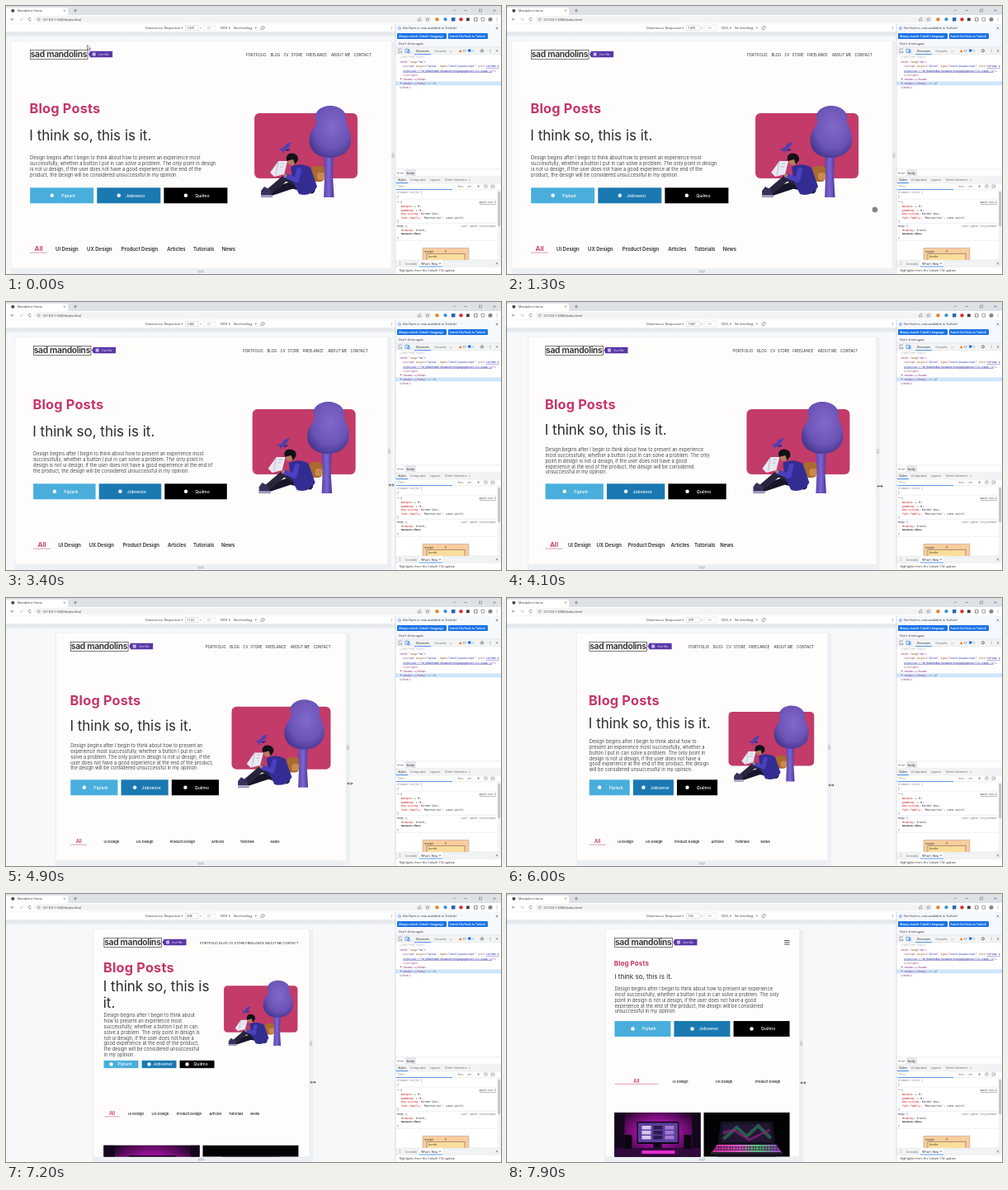
Animation of 600 by 325 pixels, one loop 8000 ms. Source, as an HTML page:

```html
<!DOCTYPE html>
<html lang="en">
<head>
<meta charset="utf-8">
<title>Responsive page preview</title>
<style>
html, body { margin: 0; width: 100%; height: 100%; overflow: hidden; background: #fff; }
svg { display: block; width: 600px; height: 325px; }
text { white-space: pre; }
.ui { font-family: "Open Sans", "Noto Sans", sans-serif; }
.code { font-family: "DejaVu Sans Mono", "Noto Sans Mono", monospace; }
.page { font-family: Inter, "Open Sans", sans-serif; }
</style>
</head>
<body>
<svg viewBox="0 0 600 325" xmlns="http://www.w3.org/2000/svg">
  <defs>
    <linearGradient id="bark"><stop offset="0" stop-color="#5c46ad"/><stop offset=".5" stop-color="#7d64d2"/><stop offset="1" stop-color="#4b3796"/></linearGradient>
    <radialGradient id="leaf" cx=".55" cy=".4" r=".65"><stop offset="0" stop-color="#8069c9"/><stop offset=".65" stop-color="#6b54b6"/><stop offset="1" stop-color="#46358e"/></radialGradient>
    <radialGradient id="glow" cx=".5" cy=".4" r=".55"><stop offset="0" stop-color="#e31bd0"/><stop offset=".5" stop-color="#8c0f8c"/><stop offset="1" stop-color="#190520"/></radialGradient>
    <linearGradient id="keys"><stop offset="0" stop-color="#d02a9a"/><stop offset=".4" stop-color="#e85bd0"/><stop offset=".65" stop-color="#52c77a"/><stop offset="1" stop-color="#a83ad0"/></linearGradient>
    <clipPath id="view"><rect id="viewBox" y="43" height="275.5"/></clipPath>
  </defs>
  <g id="frame"></g>
  <g id="live"></g>
</svg>
<script>
const SCALE = 0.3135, MID = 236.5, TOP = 43, BOTTOM = 318.5, LOOP = 8000, STEP = 100;
const PINK = '#c5356a', INK = '#2d2d2f', GREY = '#5f6368';
const $ = id => document.getElementById(id);

const rect = (x, y, w, h, fill, more = '') =>
  `<rect x="${x}" y="${y}" width="${w}" height="${h}" fill="${fill}" ${more}/>`;
const circle = (x, y, r, fill, more = '') =>
  `<circle cx="${x}" cy="${y}" r="${r}" fill="${fill}" ${more}/>`;
const line = (d, color = GREY, width = .6, more = '') =>
  `<path d="${d}" fill="none" stroke="${color}" stroke-width="${width}" ${more}/>`;
const shape = (d, fill) => `<path d="${d}" fill="${fill}"/>`;
const esc = s => String(s).replace(/&/g, '&amp;').replace(/</g, '&lt;');
const text = (x, y, s, size, fill = '#333', more = '') =>
  `<text x="${x}" y="${y}" font-size="${size}" fill="${fill}" ${more}>${esc(s)}</text>`;
const cross = (x, y, r = 1.3) =>
  line(`M${x - r} ${y - r}l${2 * r} ${2 * r}m0 ${-2 * r}l${-2 * r} ${2 * r}`);
const dots = (x, y) => [-1.5, 0, 1.5].map(d => circle(x, y + d, .45, GREY)).join('');
const caret = (x, y) => shape(`M${x} ${y}h2.4l-1.2 1.6z`, GREY);

// Browser window

function titleBar() {
  return rect(0, 0, 600, 11, '#dee1e6') + shape('M0 11V3Q0 2 2 2H73Q75 2 75 4V11Z', '#fff') +
    circle(8.3, 5.8, 2, '#4a4a4a') + text(14, 7, 'Mandolins Home', 3.75) + cross(71, 5.5, 1) +
    line('M82 5.5h4m-2-2v4') + line('M542 4.5l1.5 1.5 1.5-1.5M555.5 5.5h3.4') +
    line('M573.5 4h3v3h-3z', GREY, .5) + cross(592, 5.5) +
    rect(0, 11, 600, 10.5, '#fff') +
    line('M9.5 16.2H6m1.6-1.6L6 16.2l1.6 1.6') +
    line('M16.5 16.2H20m-1.6-1.6l1.6 1.6-1.6 1.6', '#b5b8bc') +
    line('M30.5 15a1.8 1.8 0 1 0 .2 1.8') +
    rect(35, 12.3, 481, 7.8, '#f1f3f4', 'rx="3.9"') +
    circle(39.6, 16.2, 1.4, 'none', `stroke="${GREY}" stroke-width=".5"`) +
    text(44, 17.6, '127.0.0.1:5500/index.html', 3.9) +
    line('M499.5 15.5v2.5h3.4v-2.5M501 17v-3h1.5', GREY, .5) +
    line('M511 14l.7 1.5 1.6.1-1.2 1 .4 1.6-1.5-.8-1.5.8.4-1.6-1.2-1 1.6-.1z', GREY, .45) +
    circle(522.5, 16.2, 2.2, '#e8852e') + circle(532.5, 16.2, 2.1, '#3b8fe0') +
    rect(540, 14, 4.5, 4.5, '#2667b8') + circle(551.5, 16.2, 2.2, '#d5333b') +
    rect(558, 14.4, 3.8, 3.8, '#444') + line('M567.5 14.3h3.6v3.8h-3.6z', '#444') +
    line('M576 14.3h3.6v3.8H576z') + circle(587, 16.2, 2.5, '#8a8484') + dots(595, 16.2);
}

function deviceBar() {
  let s = rect(0, 21.3, 472, 303.7, '#f6f8fa') + rect(0, 21.3, 472, 10, '#fff') +
    line('M0 21.3H600', '#dadce0', .5) +
    text(169, 28, 'Dimensions: Responsive', 3.75) + caret(212, 26) +
    rect(217.5, 23.2, 15.5, 6.6, '#fff', 'stroke="#c8cacd" stroke-width=".5"') +
    rect(239, 23.2, 15, 6.6, '#fff', 'stroke="#dcdee0" stroke-width=".5"') +
    text(234.9, 28, '×', 3.8, GREY) + text(242.5, 28, '981', 3.75, '#aaa') +
    text(259, 28, '100%', 3.75) + caret(269.8, 26) +
    text(276, 28, 'No throttling', 3.75) + caret(301.5, 26) +
    line('M309 26.5l2.5-2.5 2 2-2.5 2.7zM308.8 28.6l1 .8', '#444', .6) + dots(467.5, 26.5) +
    rect(0, 31.2, 472, 5.4, '#e6e9ed');
  for (let x = 17; x < 470; x += 31.35) s += rect(x, 31.8, .5, 4.2, '#f7f8f9');
  return s;
}

// Each code line is a row of [text, colour] parts
const code = (x, y, parts, more = '') =>
  `<text class="code" x="${x}" y="${y}" font-size="3.35" ${more}>` +
  parts.map(([s, c, m = '']) => `<tspan fill="${c}" ${m}>${esc(s)}</tspan>`).join('') + '</text>';

function devTools() {
  const tag = '#8b1f7c', attr = '#994500', val = '#1a1aa6', link = 'text-decoration="underline"';
  const rule = (y, name, value) => code(479, y, [[name, '#c80000'], [': ' + value + ';', '#222']]);
  const tab = (x, y, s, c = GREY) => text(x, y, s, 3.75, c);
  const bold = 'font-weight="600"';
  return rect(472, 21.5, 128, 303.5, '#fff') + rect(472, 21.5, 128, 28.3, '#f5f8fd') +
    circle(477, 27, 1.5, 'none', 'stroke="#1a73e8" stroke-width=".5"') + rect(476.8, 26.6, .4, 1.2, '#1a73e8') +
    text(481, 28.4, 'DevTools is now available in Turkish!', 3.9) + cross(595, 27) +
    rect(474, 33, 60, 7, '#1a73e8', 'rx="1"') + text(476.2, 37.8, "Always match Cobalt's language", 3.5, '#fff', bold) +
    rect(536, 33, 48, 7, '#1a73e8', 'rx="1"') + text(537.6, 37.8, 'Switch DevTools to Turkish', 3.4, '#fff', bold) +
    text(476, 46.6, "Don't show again", 3.75) +
    rect(472, 49.8, 128, 8.8, '#f1f3f4') + line('M472 49.8h128M472 58.6h128', '#d3d6da', .4) +
    line('M480 55v1.5h-4V52h4M478 54l2 2', GREY, .5) + line('M484 52.2h4v4h-4zm3 1.5h2.2v3H487z', '#1a73e8', .6) +
    tab(497, 55.8, 'Elements', '#222') + rect(495, 58, 20, .7, '#1a73e8') + tab(519.5, 55.8, 'Console') + tab(538.5, 55.6, '»') +
    shape('M549 56l1.7-3.2 1.7 3.2z', '#e8710a') + text(553.4, 55.8, '17', 3.6) +
    rect(560, 52.6, 3.5, 3, '#1a73e8', 'rx=".5"') + text(565, 55.8, '1', 3.6) +
    circle(577, 54.3, 1.5, 'none', `stroke="${GREY}" stroke-width=".9"`) + dots(587, 54.3) + cross(595, 54.3) +
    code(477, 63, [['<!DOCTYPE html>', '#aaa']]) +
    code(477, 68.6, [['<html ', tag], ['lang', attr], ['="', tag], ['en', val], ['">', tag]]) +
    code(481, 74, [['<script ', tag], ['async', attr], ['="', tag], ['false', val], ['" ', tag], ['type', attr], ['="', tag],
      ['text/javascript', val], ['" ', tag], ['src', attr], ['="', tag], ['chrome-e', val, link]]) +
    code(481, 79.6, [['xtension://fnjhmkhhmkbjkkabndcnnogagogbneec/in-page.js', val, link], ['">', tag]]) +
    code(481, 85, [['<\/script>', tag]]) +
    rect(472, 91.4, 128, 4.9, '#cfe6fb') + caret(477.5, 87.8) + caret(477.5, 92.9) +
    code(481, 89.8, [['<head>', tag], ['…', '#888'], ['</head>', tag]]) +
    code(481, 95.2, [['<body>', tag], ['…', '#888'], ['</body>', tag], [' == $0', '#777']]) +
    code(477, 100.4, [['</html>', tag]]) +
    line('M472 197.8h128M472 206.4h128M472 215h128M472 222.8h128', '#d3d6da', .4) +
    rect(484, 198, 13, 8.2, '#e4e7eb') + tab(474, 203.6, 'html') + tab(486, 203.6, 'body', '#222') +
    rect(472, 206.6, 128, 8.3, '#f1f3f4') + tab(475, 212.2, 'Styles', '#222') + rect(473, 214.3, 14, .8, '#1a73e8') +
    tab(490, 212.2, 'Computed') + tab(514, 212.2, 'Layout') + tab(532, 212.2, 'Event Listeners') + tab(561, 212, '»') +
    tab(474.5, 220, 'Filter', '#888') + rect(473, 222, 68, .7, '#1a73e8') +
    tab(547, 220, ':hov') + tab(558.5, 220, '.cls') + line('M571 218.6h3.4m-1.7-1.7v3.4M580 217h3v3h-3zM588 217h3.5v3.3H588z', GREY, .5) +
    code(474, 227, [['element.style {', '#777']]) + code(474, 232, [['}', '#222']]) +
    line('M472 234.2h123M472 263.4h123', '#dadce0', .4) +
    code(474, 239, [['* {', '#222']]) + code(594, 239, [['main.css:2', '#333', link]], 'text-anchor="end"') +
    rule(243.7, 'margin', '▸ 0') + rule(248.5, 'padding', '▸ 0') + rule(253.2, 'box-sizing', 'border-box') +
    rule(258, 'font-family', "'Montserrat', sans-serif") + code(474, 262.4, [['}', '#222']]) +
    code(474, 268, [['body {', '#222']]) +
    code(594, 268, [['user agent stylesheet', '#666']], 'text-anchor="end" font-style="italic"') +
    rule(272.6, 'display', 'block') + code(479, 277.2, [['margin: 8px;', '#222', 'text-decoration="line-through"']]) +
    code(474, 281.8, [['}', '#222']]) + line('M472 284.5h123', '#dadce0', .4) +
    rect(505, 293.5, 56, 16, '#f9cc9d', 'stroke="#333" stroke-width=".4" stroke-dasharray="1 .8"') +
    text(507, 298.6, 'margin', 3.4) + text(532, 298.6, '8', 3.4) +
    rect(510, 300.6, 46, 9, '#fddd9b', 'stroke="#333" stroke-width=".4"') + text(512, 305.4, 'border', 3.4) + text(532, 305.4, '-', 3.4) +
    rect(595.5, 223, 4.5, 85, '#f4f4f4') + rect(596.2, 225, 3, 42, '#c4c6c9') +
    rect(472, 308, 128, 8.3, '#f1f3f4') + line('M472 308h128M472 316.3h128', '#d3d6da', .4) +
    dots(477.5, 312) + tab(484, 313.6, 'Console') + rect(501, 308.2, 28, 8, '#fff') + tab(503, 313.6, "What's New", '#222') +
    cross(526, 312.2, .9) + rect(501, 315.6, 28, .7, '#1a73e8') + cross(595, 312.2) +
    text(476.5, 322.2, 'Highlights from the Cobalt 114 update', 3.8) +
    line('M472 21.3V325', '#c9ccd0', .6);
}

// Web page

const WORDS = ('Design begins after I begin to think about how to present an experience most successfully, ' +
  'whether a button I put in can solve a problem. The only point in design is not ui design, if the user does not ' +
  'have a good experience at the end of the product, the design will be considered unsuccessful in my opinion.').split(' ');
// [narrowest width, word counts where lines end]
const BREAKS = [
  [1450, [14, 30, 48]], [1380, [14, 29, 47]], [1200, [13, 27, 42, 54]], [1040, [12, 22, 36, 49]],
  [940, [10, 17, 29, 41, 51]], [850, [10, 17, 28, 40, 50, 57]],
  [768, [8, 14, 22, 31, 41, 49, 55]], [0, [13, 27, 42, 54]]
];
const NAV = [['PORTFOLIO', 153], ['BLOG', 123.5], ['CV', 107.5], ['STORE', 98.5], ['FREELANCE', 80.3], ['ABOUT ME', 49.8], ['CONTACT', 22.4]];
const TABS = ['All', 'UI Design', 'UX Design', 'Product Design', 'Articles', 'Tutorials', 'News'];
const BUTTONS = [['Piplark', '#49aedb'], ['Jobvenor', '#1a79b1'], ['Quilmo', '#000']];

function lines(w) {
  const ends = BREAKS.find(b => w > b[0])[1];
  return [...ends, WORDS.length].map((end, i) => WORDS.slice(i ? ends[i - 1] : 0, end).join(' '));
}

const art = rect(301, 130, 125, 79, '#c23b69', 'rx="6"') +
  shape('M385 180H397L396 206 397.5 232H385L386 206Z', 'url(#bark)') +
  shape('M393 121C404 121 414 128 412 138C411 143 418 149 418 162C418 176 407 184 392 184C378 184 367.5 176 367.5 163C367.5 150 377 146 376 139C372 129 381 121 393 121Z', 'url(#leaf)') +
  shape('M330 174l6-2 4-5 6-2-3 6-6 4-1 4-2-4z', '#4b3fb4') + shape('M337 175l5-2 3 1-4 2z', '#30298a') +
  rect(370, 194, 16, 19, '#a9692f', 'rx="5"') + rect(377, 202, 9, 9, '#c98a4b', 'rx="3"') +
  line('M370 223L347 217 317 227', '#17162a', 9, 'stroke-linecap="round" stroke-linejoin="round"') +
  line('M367 222L339 208 318 226', '#26253b', 8, 'stroke-linecap="round" stroke-linejoin="round"') +
  shape('M309 224l4-5 7 4 3 9h-14z', '#35325b') + rect(308.5, 229.5, 15, 2, '#c5bfe0', 'rx="1"') +
  shape('M345 195Q357 189 369 196L377 219Q370 232 355 228L347 212Z', '#332d93') +
  circle(346, 188.5, 4.5, '#b97b5c') + shape('M340 188Q338 179 346 178.5Q355 179 354 187L350 192 348 186Z', '#111118') +
  line('M355 199L352 211 339 206', '#4a40c0', 6, 'stroke-linecap="round" stroke-linejoin="round"') +
  circle(338, 205.5, 2.2, '#b97b5c') + shape('M320 202L330 188 341 188 337 204 325 207Z', '#e9e8f2') +
  line('M330 188L327 205M333 191l4 0M332 195l4 0', '#9a97b5', .6);

// Card pictures are drawn on a 104 by 60 area
const monitor = rect(0, 0, 104, 60, '#190520') + rect(0, 0, 104, 60, 'url(#glow)') +
  rect(0, 0, 12, 60, '#14061c') + rect(94, 0, 10, 60, '#14061c') +
  rect(27, 11, 51, 27, '#0d0716') + rect(28.5, 12.5, 48, 23.5, '#5d3f9c') +
  [0, 1, 2, 3, 4, 5, 6, 7, 8].map(i => rect(33 + i % 3 * 14, 16 + Math.floor(i / 3) * 6, 11, 4.5, ['#d9c4ee', '#2a1c4f', '#a078d0'][i % 3])).join('') +
  rect(47, 38, 10, 5, '#0d0716') + rect(0, 43, 104, 17, '#32093c') + rect(33, 46, 40, 4, '#e52bd0') +
  rect(12, 27, 9, 17, '#0b0510') + rect(84, 27, 9, 17, '#0b0510') + rect(5, 53, 94, 7, '#0f0614');
const laptop = rect(0, 0, 104, 60, '#030305') + shape('M21 11H83L87 39H17Z', '#15121f') +
  shape('M24 14H80L83 36H21Z', '#231534') + line('M24 32L40 18 52 29 66 16 81 31', '#2a7b59', 4, 'opacity=".7"') +
  line('M23 25L36 21 55 33 80 21', '#8a257d', 3, 'opacity=".7"') +
  shape('M16 39H88L94 48H10Z', 'url(#keys)') +
  line('M14 42H91M12 45H93', '#17101f', .8) + line('M14 43.5H91', '#17101f', 6, 'stroke-dasharray=".5 3"') +
  rect(8, 48, 88, 2.5, '#27202e') + shape('M12 51H92L80 58H24Z', '#160c1c');

function page(w) {
  const W = w * SCALE, left = MID - W / 2, x0 = left + W * .05, x1 = left + W * .95, full = x1 - x0;
  const phone = w <= 768, tight = !phone && w <= 940, small = w <= 1200;
  const body = lines(w), n = body.length, grow = tight ? (n - 7) * 6.85 : 0;
  const col = phone ? full : full * (small ? .568 : .577);
  let s = rect(left, TOP, W, BOTTOM - TOP, '#fefdfc');

  s += rect(x0 + .3, 53.3, 69.6, 11, 'none', 'stroke="#3a3a3a" stroke-width=".7"') +
    text(x0 + .6, 62.2, 'sad mandolins', 10.3, INK, 'font-weight="600" letter-spacing="-.29"') +
    shape(`M${x0 + 71} 58.5l2-3.7h27v7.4h-27z`, '#5a37a6') + rect(x0 + 75.5, 56.5, 4, 4, '#c9b8ee') +
    text(x0 + 82.5, 59.8, 'Visit Me', 3.4, '#e4dbf8');

  if (phone) s += line(`M${x1 - 6.5} 56.5h6.5m0 2.3h-6.5m0 2.3h6.5`, '#333', .8);
  else if (tight) s += text(x1, 60.7, NAV.map(v => v[0]).join(' '), 3.9, INK, 'text-anchor="end"');
  else NAV.forEach(([label, dx]) => s += text(x1 - dx, 60.7, label, 4.4, INK));

  const y1 = phone ? 86.8 : tight ? 95.3 : 130.3;
  s += text(x0 - .6, y1, 'Blog Posts', phone ? 8 : 16.3, PINK, `font-weight="700" letter-spacing="${phone ? .1 : .2}"`);
  const head = !tight ? ['I think so, this is it.'] : col < 132 ? ['I think so, this', 'is it.'] : ['I think so, this is', 'it.'];
  const y2 = phone ? 102.8 : tight ? 118 : 163 - 2.5 * (n - 4);
  head.forEach((h, i) => s += text(x0 - (phone ? 0 : .8), y2 + i * 19.7, h, phone ? 8 : 17, INK));
  const y3 = phone ? 117 : tight ? 149.2 : 186 - 5 * (n - 4);
  body.forEach((b, i) => s += text(x0, y3 + i * 6.85, b, 5.65, '#444850', 'letter-spacing=".02"'));

  const by = phone ? 154 : tight ? 195 + grow : 220.3, bh = tight ? 9.3 : 19, bw = (col - 8) / 3;
  BUTTONS.forEach(([label, fill], i) => {
    const x = x0 + i * (bw + 4), c = x + bw / 2, m = by + bh / 2;
    s += rect(x, by, bw, bh, fill) +
      rect(x + .2, by + .2, bw - .4, bh - .4, 'none', 'stroke="#fff" stroke-opacity=".35" stroke-width=".4" stroke-dasharray=".8 .8"') +
      circle(c - 12, m, 2.2, '#fff') +
      text(c + (tight ? 4.5 : 8), m + 1.9, label, 5.2, '#fff', 'text-anchor="middle" font-weight="500"');
  });

  if (!phone) {
    const size = Math.min(125, full * .379) / 125, cx = x1 - full * .1935, cy = tight ? 141 + grow / 2 : 176.5;
    s += `<g transform="translate(${cx} ${cy}) scale(${size}) translate(-363.5 -176.5)">${art}</g>`;
  }

  const ty = phone ? 226.5 : tight ? 259 + grow : 295;
  const tab = (label, c, i) => text(c, ty + (i ? 2 : 2.4), label, i ? (small ? 4.1 : 6) : (small ? 5.7 : 8.2),
    i ? INK : PINK, 'text-anchor="middle" font-weight="600"');
  const under = (x, width) => rect(x, ty + 3.8, width, .6, PINK, 'opacity=".8"');
  if (phone) {
    s += under(x0, full / 4);
    TABS.slice(0, 4).forEach((label, i) => s += tab(label, x0 + full * (i + .5) / 4, i));
  } else {
    const widths = small ? [20, 20, 21, 31, 15, 17, 11] : [21, 28, 31, 47, 22, 25, 16];
    const gap = (full * (small ? .8 : .6) - widths.reduce((a, b) => a + b)) / 6;
    let x = x0;
    s += under(x0, widths[0]);
    TABS.forEach((label, i) => { s += tab(label, x + widths[i] / 2, i); x += widths[i] + gap; });
  }

  if (phone || tight) {
    const k = (full - 4) / 2 / 104, cy = phone ? 265 : 298 + grow;
    [monitor, laptop].forEach((pic, i) =>
      s += `<g transform="translate(${x0 + i * (104 * k + 4)} ${cy}) scale(${k})">${pic}</g>`);
  }

  const right = left + W;
  $('viewBox').setAttribute('x', left);
  $('viewBox').setAttribute('width', W);
  return rect(left - .4, TOP - .4, W + .8, BOTTOM - TOP + .8, '#e3e6ea') +
    rect(right, TOP, 4.6, BOTTOM - TOP + 6, '#edf0f3') + rect(left, BOTTOM, W, 6, '#edf0f3') +
    line(`M${right + 1.2} 178.5v5.5m1.7 0v-5.5`, '#9a9da1', .6) +
    line('M232.5 321.2h7.5m0 1.7h-7.5', '#9a9da1', .6) +
    `<g class="page" clip-path="url(#view)">${s}</g>` +
    text(219.5, 28, Math.round(w), 3.75, '#222', 'class="ui"');
}

// Motion: rows of [time, value, ...]

const WIDTH = [[0, 1470], [3000, 1470], [3400, 1442], [3800, 1420], [4700, 1200], [4900, 1122], [6000, 970], [6500, 920], [7900, 752]];
const POINTER = [[0, 98.5, 47.5], [200, 108, 56], [900, 385, 218], [1300, 446, 247], [2000, 446, 247], [2600, 468, 222],
  [3000, 470, 222], [3400, 466, 222], [4900, 417, 225], [6000, 393.5, 227], [7900, 358.5, 229]];

function at(rows, t, k = 1) {
  const i = rows.findIndex(r => r[0] > t);
  if (i < 0) return rows[rows.length - 1][k];
  const a = rows[i - 1], b = rows[i];
  return a[k] + (b[k] - a[k]) * (t - a[0]) / (b[0] - a[0]);
}

function pointer(t, w) {
  const x = t >= 3000 ? MID + w * SCALE / 2 + 4.5 : at(POINTER, t), y = at(POINTER, t, 2);
  if (t < 200) return `<path d="M${x} ${y}v5.6l1.4-1.2 1 2 .9-.4-.9-2h1.7z" fill="#fff" stroke="#222" stroke-width=".5"/>`;
  if (x < 466 && t < 3000) return circle(x, y, 3.2, '#6d6d6d', 'fill-opacity=".85" stroke="#999" stroke-width=".5"');
  const arrow = `M${x - 3} ${y}h6m-4.6-1.5l-1.5 1.5 1.5 1.5m3.2-3l1.5 1.5-1.5 1.5`;
  return line(arrow, '#fff', 1.6) + line(arrow, '#222', .7);
}

function draw(t) {
  const w = at(WIDTH, t);
  $('live').innerHTML = page(w) + pointer(t, w);
}

$('frame').innerHTML = `<g class="ui">${deviceBar()}${titleBar()}${devTools()}</g>`;
const start = performance.now();
let last = -1;
function tick() {
  const t = Math.floor((performance.now() - start) % LOOP / STEP) * STEP;
  if (t !== last) draw(last = t);
  requestAnimationFrame(tick);
}
tick();
</script>
</body>
</html>
```
